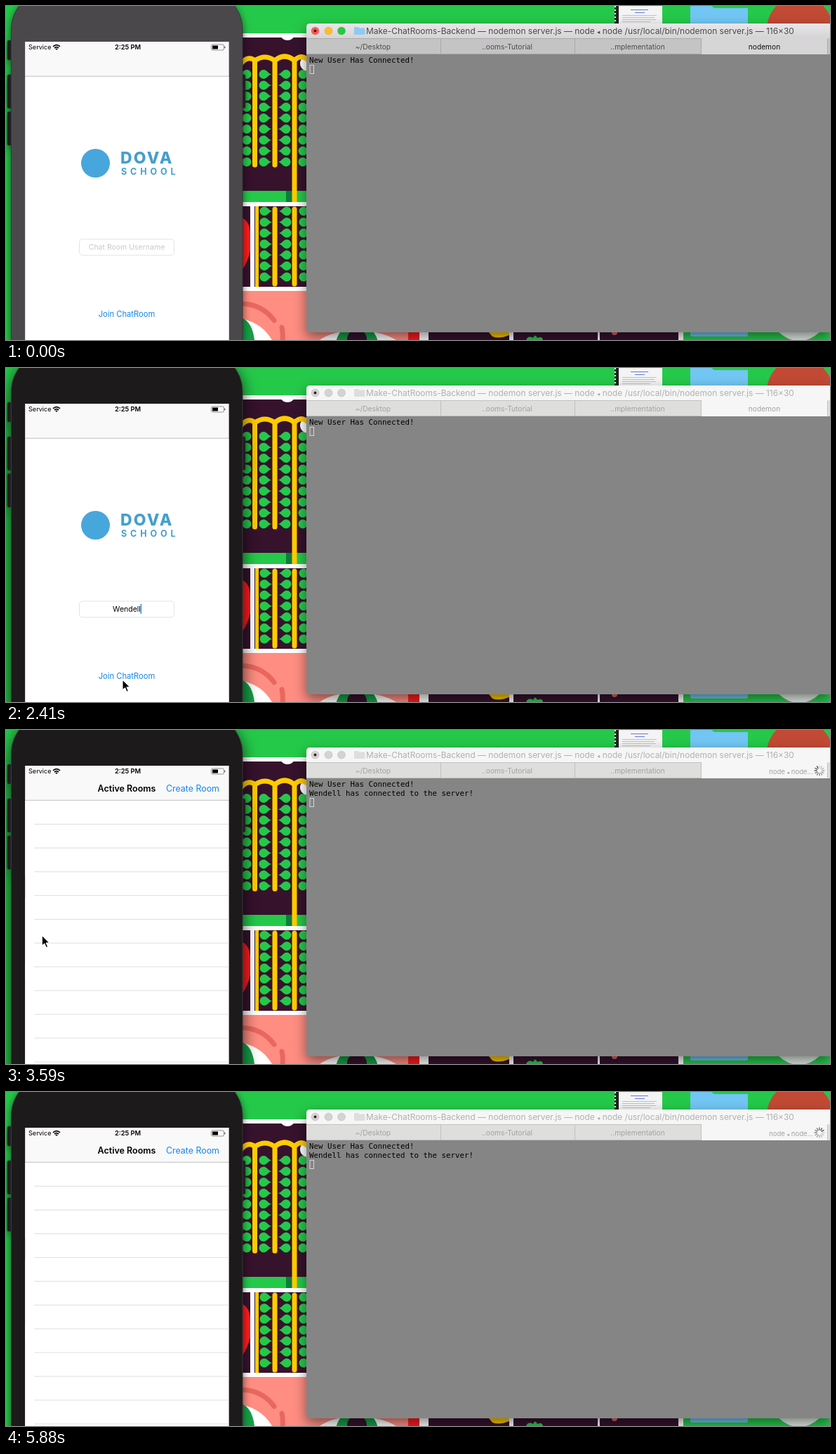
Recreate the animation shown at these times as an HTML page. Size 1174 by 477 pixels, loop 6.88 s.

```html
<!DOCTYPE html>
<html lang="en">
<head>
<meta charset="utf-8">
<title>Chat room demo</title>
<style>
html, body { margin: 0; width: 100%; height: 100%; overflow: hidden; background: #25c94a; }
svg { display: block; width: 1174px; height: 477px; font-family: Inter, "Open Sans", sans-serif; }
text { white-space: pre; }
.mid { text-anchor: middle; }
.mono { font: 10.8px "DejaVu Sans Mono", "Liberation Mono", monospace; }
.blue { fill: #1585ee; }
.case { fill: #4b484b; }
.phone { filter: drop-shadow(0 4px 6px #0009); }
.window { filter: drop-shadow(0 7px 9px #0007); }
.bar { fill: url(#chrome); }
.tabs { fill: #c5c4c5; }
.tab { fill: #d7d6d7; }
.title { fill: #4a494a; font-size: 11.95px; }
.label { fill: #4c4b4c; font-size: 10.2px; }
.current { fill: #111; }
.icon { fill: #8fcaf0; }
.focus .case { fill: #1c1a1b; }
.shade .phone { filter: drop-shadow(0 7px 11px #000b); }
.focus .bar, .focus .tab { fill: #f6f6f6; }
.focus .tabs { fill: #dededc; }
.focus .title { fill: #b0b0b0; }
.focus .label { fill: #a2a2a2; }
.focus .light { fill: #d3d3d3; }
.focus .icon { fill: #dedede; }
</style>
</head>
<body>
<svg id="stage" viewBox="0 0 1174 477">
  <defs>
    <linearGradient id="chrome" x2="0" y2="1"><stop stop-color="#e9e7e9"/><stop offset="1" stop-color="#d5d3d5"/></linearGradient>
    <clipPath id="screen"><path d="M27.400 51h290v426h-290z"/></clipPath>
    <clipPath id="wall"><path d="M337 45h91v432h-91z"/></clipPath>
    <path id="leaf" d="M10 0C5 0 3 6.500-2 6.500A6.500 6.500 0 0 1-2-6.500C3-6.500 5 0 10 0z" fill="#25c94a"/>
  </defs>

  <!-- Desktop -->
  <path fill="#25c94a" d="M0 0h1174v477H0z"/>
  <path fill="#fff" d="M330 39h110v438H330zM428 460h537v17H428z"/>
  <path fill="#36122d" d="M337 45h91v220h-91zM337 286h11v115h-11zM354 286h74v115h-74zM602 460h115v17H602zM723 460h120v17H723zM846 460h112v17H846z"/>
  <path fill="#25c94a" d="M337 264h91v16h-91z"/>
  <path fill="#0b7d3b" d="M399 264h9v16h-9z"/>
  <g clip-path="url(#wall)">
    <g id="leaves"></g>
    <circle cx="401" cy="38" r="11" fill="#fff"/>
    <circle cx="430" cy="82" r="11" fill="#fff"/>
    <g fill="none" stroke="#ffcc00" stroke-width="7" stroke-linecap="round">
      <path d="M354.500 80V227M383 80V227M411 80V280M383 290V397M411 290V397"/>
      <path d="M335 82Q345 70 354.500 78Q369 68 383 78Q397 66 411 78Q420 68 430 77"/>
    </g>
    <path fill="#ffcc00" d="M355 286h5v115h-5z"/>
    <path fill="#ff1a1c" d="M337 303Q348 308 348 328V350Q344 366 337 376z"/>
    <path fill="#fff" d="M337 401h91v6h-91zM337 280h91v6h-91z"/>
  </g>
  <path fill="#ff8d82" d="M337 407h91v53h145v17H337z"/>
  <path fill="none" stroke="#e9675d" stroke-width="7" stroke-linecap="round" d="M330 425Q364 424 382 449M393 459Q395 467 394 479"/>
  <path fill="#fff" d="M337 447Q365 453 379 477H337zM447 477Q465 464 500 463Q535 464 556 477z"/>
  <path fill="#149f45" d="M337 446Q351 452 354 477H337z"/>
  <circle cx="500" cy="484" r="30" fill="#149f45"/>
  <circle cx="500" cy="476" r="14" fill="#36122d"/>
  <path fill="#ff1a1c" d="M573 460h16v17h-16z"/>
  <path fill="#ffcc00" d="M688 466h29v4q-14 6-24 2z"/>
  <path fill="#25c94a" d="M741 477q3-7 10-3 3-7 6 0 7-3 8 3z"/>
  <circle cx="867" cy="466" r="4" fill="#e9675d"/>

  <!-- Desktop icons -->
  <path fill="#f4f4f4" d="M872 0h63v30h-63z"/>
  <path fill="#222" d="M867 0h6v30h-6z"/>
  <path stroke="#eee" stroke-width="2" stroke-dasharray="2 3" d="M868 0V26"/>
  <path stroke="#c2c2c2" d="M878 13.500h49M878 16.500h46M878 19.500h48M878 22.500h40"/>
  <path stroke="#6479d8" d="M890 5.500h25M896 9.500h14"/>
  <path fill="#72c6f4" d="M975 3V0h30l4 3h48v23h-82zM975 460h82v10q0 2-2 2h-78q-2 0-2-2z"/>
  <circle cx="1131" cy="33" r="47" fill="#c24a35"/>
  <circle cx="1130" cy="438" r="40" fill="#e4ece6"/>

  <!-- Phone -->
  <g class="phone">
    <path fill="#1f1e20" stroke="#333" stroke-width=".6" d="M7 49H4q-2 0-2 2v24q0 2 2 2h3zM7 98H4q-2 0-2 2v44q0 2 2 2h3zM7 151H4q-2 0-2 2v44q0 2 2 2h3zM336 98h3q2 0 2 2v44q0 2-2 2h-3z"/>
    <rect class="case" x="7.500" y="-22" width="329.500" height="560" rx="55" stroke="#39373a"/>
  </g>
  <g clip-path="url(#screen)">
    <path fill="#fff" d="M27 51h291v426H27z"/>
    <g id="login">
      <path fill="#fff" d="M27 101h291v376H27z"/>
      <circle cx="127.500" cy="224.500" r="20.500" fill="#47a6dc"/>
      <g fill="#459fcd">
        <text x="163" y="225" font-size="23" font-weight="800" letter-spacing="2.200">DOVA</text>
        <text x="164" y="241" font-size="12.500" font-weight="700" letter-spacing="4.900">SCHOOL</text>
      </g>
      <rect x="104.500" y="333" width="135" height="23" rx="4.500" fill="#fff" stroke="#e3e3e3"/>
      <text id="field" class="mid" x="172" y="348" font-size="10.500"></text>
      <path id="beam" d="M0 337v14" stroke="#2f86f5" stroke-width="1.500"/>
      <text class="mid blue" x="172" y="444" font-size="11.200">Join ChatRoom</text>
    </g>
    <g id="rooms">
      <path fill="#fff" d="M27 101h291v376H27z"/>
      <path id="rows" stroke="#dedee1"/>
    </g>
    <path fill="#f9f9f9" d="M27 51h291v49H27z"/>
    <path stroke="#b9b9bb" stroke-width=".9" d="M27 100.300h291"/>
    <g id="nav">
      <text class="mid" x="172" y="88" font-size="12.500" font-weight="600">Active Rooms</text>
      <text class="blue" x="228" y="88" font-size="12.400">Create Room</text>
    </g>
    <text x="32" y="62" font-size="9.100">Service</text>
    <text class="mid" x="173.500" y="62" font-size="9.300" font-weight="600">2:25 PM</text>
    <path fill="none" stroke="#000" stroke-width="1.700" d="M67 57.800Q72 53.300 77 57.800M69 60Q72 57.400 75 60"/>
    <path d="M70.200 61.200Q72 59.800 73.800 61.200L72 63z"/>
    <rect x="292.500" y="55" width="18" height="8" rx="2" fill="none" stroke="#777" stroke-width=".8"/>
    <path d="M294 56.500h8v5h-8zM311.500 57.500q2 1.500 0 3z"/>
  </g>

  <!-- Terminal -->
  <g class="window">
    <path class="bar" d="M428 46V30q0-5 5-5h741v21z"/>
    <path class="tabs" d="M428 46h746v23H428z"/>
    <path fill="#858585" d="M428 69h746v397H433q-5 0-5-5z"/>
  </g>
  <path class="tab" d="M991 46h179v23H991z"/>
  <path stroke="#0002" d="M428 46.500h563M428 68.500h563M619.500 47v21M810.500 47v21M990.500 47v21M1170.500 47v21"/>
  <g stroke="#0002" stroke-width=".6">
    <circle class="light" cx="440.500" cy="35.500" r="5.600" fill="#fc5b57"/>
    <circle class="light" cx="459.500" cy="35.500" r="5.600" fill="#fdbc2f"/>
    <circle class="light" cx="478" cy="35.500" r="5.600" fill="#29c840"/>
  </g>
  <circle cx="440.500" cy="35.500" r="1.900" fill="#4a1414"/>
  <path class="icon" d="M496 31q0-1 1-1h5l1.500 1.500h7q1 0 1 1V40q0 1-1 1H497q-1 0-1-1z"/>
  <text class="title mid" x="818" y="40">Make-ChatRooms-Backend — nodemon server.js — node <tspan font-size="8.500">◂</tspan> node /usr/local/bin/nodemon server.js — 116×30</text>
  <g class="mid">
    <text class="label" x="523" y="61.500">~/Desktop</text>
    <text class="label" x="714" y="61.500">..ooms-Tutorial</text>
    <text class="label" x="900" y="61.500">..mplementation</text>
    <text id="idle" class="label current" x="1080.500" y="61.500">nodemon</text>
  </g>
  <g id="busy">
    <text class="label" x="1087" y="62.500" style="font-size:9.600px">node <tspan font-size="7">◂</tspan> node...</text>
    <g id="spinner" stroke="#444" stroke-width="1.300" stroke-linecap="round"></g>
  </g>
  <text class="mono" x="432" y="81">New User Has Connected!</text>
  <text id="joined" class="mono" x="432" y="94">Wendell has connected to the server!</text>
  <rect id="prompt" x="433" width="5.500" height="12" stroke="#d6d6d6"/>

  <path id="cursor" stroke="#fff" stroke-width="1.100" stroke-linejoin="round" d="M0 0V15L3.500 11.800 6 17.500 8.400 16.400 6 10.900H10.800z"/>
</svg>
<script>
const $ = id => document.getElementById(id);
const LOOP = 6880, NAME = "Wendell";
const KEYS = [1470, 1530, 1760, 1820, 1880, 2120, 2180];

// Mouse path: time, x, y
const PATH = [
  [120, 300, 230], [420, 141, 371], [760, 191, 348], [2120, 191, 348],
  [2350, 166, 445], [2590, 166, 445], [3000, 211, 278], [3470, 110, 290],
  [3700, 1, 296], [4180, 535, 151], [4520, 500, 28], [4900, 294, 110],
  [5180, 650, 180], [5590, 760, 443], [5820, 800, 482]
];

// Columns alternate, each pair pointing at the stem between them
function leafColumns(x, y, columns, rows, dir) {
  let out = "";
  for (let c = 0; c < columns; c++)
    for (let r = 0; r < rows; r++)
      out += `<use href="#leaf" transform="translate(${x + c * 28} ${y + r * 15.65}) scale(${c % 2 ? -dir : dir} 1)"/>`;
  return out;
}
$("leaves").innerHTML = leafColumns(341, 97.5, 4, 9, -1) + leafColumns(370, 293, 3, 7, 1);

$("rows").setAttribute("d", Array.from({ length: 11 }, (_, i) => `M40 ${134.5 + i * 33.95}H318`).join(""));

$("spinner").innerHTML = Array.from({ length: 12 }, (_, i) =>
  `<path d="M0-3.800V-7" transform="translate(1159 58) rotate(${i * 30})"/>`).join("");

const show = (id, on) => $(id).style.display = on ? "" : "none";
const move = (id, x, y = 0) => $(id).setAttribute("transform", `translate(${x} ${y})`);
const clamp = v => Math.max(0, Math.min(1, v));

function mouseAt(t) {
  const i = PATH.findIndex(p => p[0] > t);
  if (i < 1) return null;
  const [t0, x0, y0] = PATH[i - 1], [t1, x1, y1] = PATH[i];
  const k = (t - t0) / (t1 - t0), e = k * k * (3 - 2 * k);
  return [x0 + (x1 - x0) * e, y0 + (y1 - y0) * e];
}

function drawField(t) {
  const typed = NAME.slice(0, KEYS.filter(k => k <= t).length);
  const field = $("field");
  field.textContent = typed || "Chat Room Username";
  field.setAttribute("fill", typed ? "#000" : "#c9c9ce");
  show("beam", t >= 1000 && !(t >= 1290 && t < 1470));
  move("beam", typed ? 172.5 + field.getComputedTextLength() / 2 : 117);
}

function draw(t) {
  $("stage").classList.toggle("focus", t >= 820);
  $("stage").classList.toggle("shade", t >= 820 && t < 5700);
  drawField(t);

  // Push from the login view to the room list
  const p = 1 - (1 - clamp((t - 2530) / 420)) ** 3;
  move("login", -87 * p);
  move("rooms", 290 * (1 - p));
  move("nav", 120 * (1 - p));
  $("nav").setAttribute("opacity", p);

  const joined = t >= 2590, busy = t >= 2650;
  show("joined", joined);
  show("idle", !busy);
  show("busy", busy);
  $("prompt").setAttribute("y", joined ? 97.5 : 84.5);
  $("prompt").setAttribute("fill", t >= 440 && t < 1000 ? "#d6d6d6" : "none");

  const step = Math.floor(Math.min(t, 5880) / 60);
  [...$("spinner").children].forEach((spoke, i) =>
    spoke.setAttribute("opacity", 1 - ((step - i + 1200) % 12) * 0.07));

  const mouse = mouseAt(t);
  show("cursor", mouse);
  if (mouse) move("cursor", ...mouse);
}

const start = performance.now();
function tick() {
  draw((performance.now() - start) % LOOP);
  requestAnimationFrame(tick);
}
tick();
</script>
</body>
</html>
```
